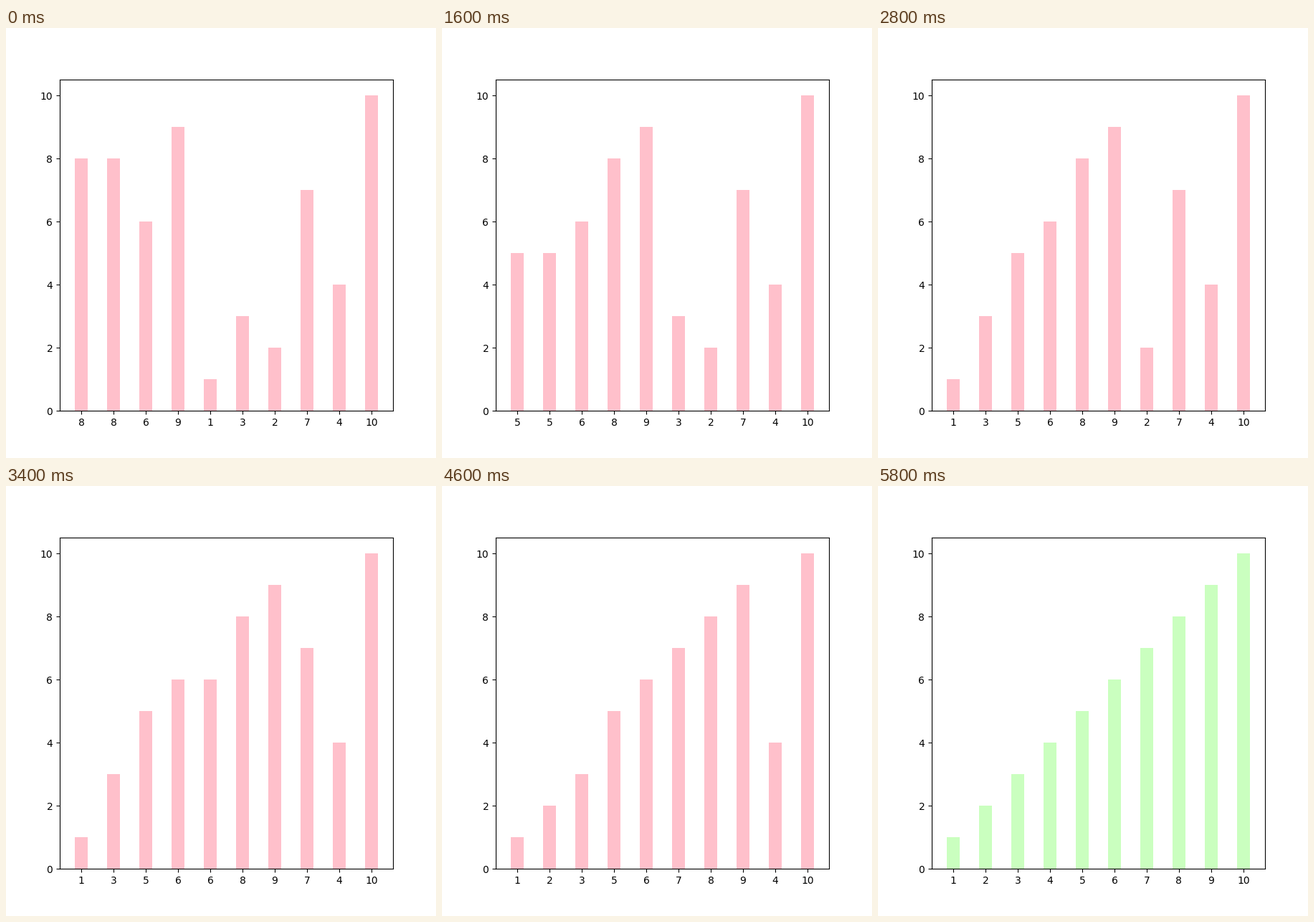
A matplotlib script that plays this animation: 600x600 px, repeating every 7.2 s.

```python
import matplotlib.pyplot as plt
from matplotlib.animation import FuncAnimation

VALUES = [8, 5, 6, 9, 1, 3, 2, 7, 4, 10]
FRAMES, INTERVAL = 36, 200
BUSY, DONE = "pink", "#caffbf"


def insertion_steps(values):
    """Yield the list after every shift and every placement."""
    items = list(values)
    for i in range(1, len(items)):
        key, j = items[i], i
        while j > 0 and items[j - 1] > key:
            items[j] = items[j - 1]
            j -= 1
            yield list(items)
        items[j] = key
        yield list(items)


steps = list(insertion_steps(VALUES))

fig, ax = plt.subplots(figsize=(6, 6), dpi=100)
positions = range(len(VALUES))
bars = ax.bar(positions, VALUES, width=0.4, color=BUSY)
ax.set_xticks(positions)


def draw(frame):
    items = steps[min(frame, len(steps) - 1)]
    color = DONE if items == sorted(VALUES) else BUSY
    for bar, value in zip(bars, items):
        bar.set_height(value)
        bar.set_facecolor(color)
    ax.set_xticklabels([str(value) for value in items])
    return bars.patches


animation = FuncAnimation(fig, draw, frames=FRAMES, init_func=lambda: draw(0),
                          interval=INTERVAL, repeat=True, repeat_delay=0)
plt.show()
```
